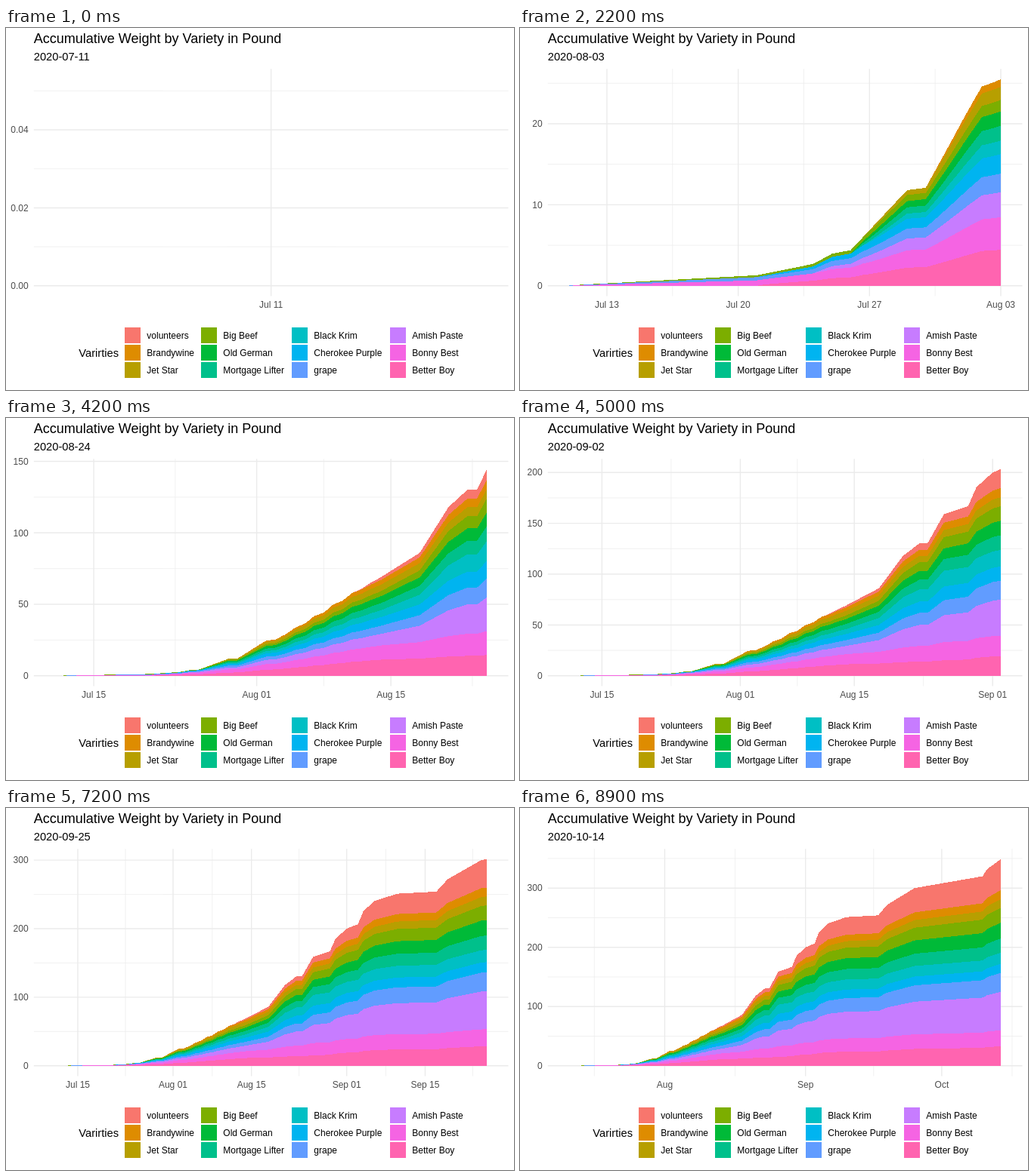
These frames come from a looping animation (672x480 px, 10 s). An HTML page with a canvas:

```html
<!DOCTYPE html>
<html lang="en">
<head>
<meta charset="utf-8">
<title>Accumulative Weight by Variety in Pound</title>
<style>
  html, body { margin: 0; width: 100%; height: 100%; overflow: hidden; background: #fff; }
  canvas { display: block; }
</style>
</head>
<body>
<canvas id="stage" width="672" height="480"></canvas>
<script>
const ctx = document.getElementById('stage').getContext('2d');
const FONT = '"Liberation Sans", Arial, sans-serif';
const PANEL = { left: 36.8, right: 664.5, top: 54.2, bottom: 355.5 };
const PAD = 0.05;
const LOOP_MS = 10000, STEP_MS = 100, LAST_STEP = 89, LAST_DAY = 95;
const DAY_MS = 864e5, START = Date.UTC(2020, 6, 11);

// Turning points of the total harvest: [day, pounds].
const TURNS = [
  [0, .053], [10, 1.3], [13, 2.7], [14, 3.95], [15, 4.4], [18, 11.8], [19, 12.1], [22, 24.8],
  [23, 25.5], [31, 58.1], [34, 69.3], [38, 86], [41, 118], [43, 130.3], [44, 130.3],
  [46, 158.8], [49, 167], [50, 185.5], [52, 200], [54, 206.5], [55, 226], [57, 240.5],
  [61, 251], [68, 254], [70, 272], [76, 300], [91, 320], [92, 332], [95, 348.8],
];

// Bottom of the stack first. A variety sets in once the total passes `since`;
// `crop` is its weight when the total reaches each of STAGES.
const STAGES = [69.3, 158.8, 348.8];
const VARIETIES = [
  { name: 'Better Boy', since: 1.3, crop: [11.3, 15.2, 33] },
  { name: 'Bonny Best', since: .053, crop: [10, 18, 27] },
  { name: 'Amish Paste', since: 2.7, crop: [8.1, 26.4, 65] },
  { name: 'grape', since: 0, crop: [5.7, 14.7, 32] },
  { name: 'Cherokee Purple', since: 1.3, crop: [6.1, 13.5, 15.3] },
  { name: 'Black Krim', since: 6, crop: [4.8, 15.5, 18.7] },
  { name: 'Mortgage Lifter', since: 4.4, crop: [5, 11.5, 24] },
  { name: 'Old German', since: 4.4, crop: [4.9, 10.5, 26.5] },
  { name: 'Big Beef', since: .053, crop: [3.5, 11, 25] },
  { name: 'Jet Star', since: 6, crop: [4.6, 7, 15] },
  { name: 'Brandywine', since: 12, crop: [3.3, 7.2, 15] },
  { name: 'volunteers', since: 58, crop: [2, 8.3, 52.3] },
];
const COLORS = ['#FF64B0', '#F564E3', '#C77CFF', '#619CFF', '#00B4F0', '#00BFC4',
  '#00C08B', '#00BA38', '#7CAE00', '#B79F00', '#DE8C00', '#F8766D'];

const lerp = (a, b, u) => a + (b - a) * u;

function totalAt(day) {
  const i = Math.max(1, TURNS.findIndex(p => p[0] >= day));
  const [d0, v0] = TURNS[i - 1], [d1, v1] = TURNS[i];
  // Around early August the big pickings come every other day.
  const evenDay = Math.abs(day % 2 - 1);
  const lull = 1.7 * evenDay * Math.exp(-(((day - 28) / 4) ** 2));
  return lerp(v0, v1, (day - d0) / (d1 - d0)) - lull;
}

function cropAt(total, { since, crop }) {
  const [s0, s1, s2] = STAGES;
  if (total <= since) return 0;
  if (total < s0) return crop[0] * ((total - since) / (s0 - since)) ** 0.8;
  return total < s1
    ? lerp(crop[0], crop[1], (total - s0) / (s1 - s0))
    : lerp(crop[1], crop[2], (total - s1) / (s2 - s1));
}

// Upper edge of each band, scaled so that the top one is the total.
function stackAt(day) {
  const total = totalAt(day);
  let sum = 0;
  const tops = VARIETIES.map(v => sum += cropAt(total, v));
  return tops.map(top => top * total / sum);
}

const dateOf = day => new Date(START + Math.floor(day) * DAY_MS);
const dayOfMonth = day => dateOf(day).getUTCDate();
const DATE_STEPS = [
  { size: 1, hit: () => true },
  { size: 2, hit: (day, first) => (day - first) % 2 === 0 },
  { size: 7, hit: day => dateOf(day).getUTCDay() === 1 },
  { size: 15.22, hit: day => [1, 15].includes(dayOfMonth(day)) },
  { size: 30.44, hit: day => dayOfMonth(day) === 1, monthly: true },
];

// Ticks of one calendar step that just cover lo..hi.
function dateTicks(step, lo, hi) {
  const first = Math.floor(lo), all = [];
  for (let day = first - 32; day < hi + 32; day++) if (step.hit(day, first)) all.push(day);
  const begin = all.filter(d => d <= lo).length - 1;
  return all.slice(begin, all.findIndex(d => d >= hi) + 1);
}

function dateBreaks(lo, hi) {
  const goal = 5, span = hi - lo;
  const miss = i => Math.abs(span / DATE_STEPS[i].size - goal);
  let best = 0;
  if (span > goal) {
    DATE_STEPS.forEach((_, i) => { if (miss(i) < miss(best)) best = i; });
    const count = i => dateTicks(DATE_STEPS[i], lo, hi).length - 1;
    const n = count(best);
    const other = Math.min(DATE_STEPS.length - 1, Math.max(0, best + Math.sign(n - goal)));
    if (Math.abs(count(other) - goal) < Math.abs(n - goal)) best = other;
  }
  const step = DATE_STEPS[best];
  const label = day => {
    const month = dateOf(day).toLocaleString('en-US', { month: 'short', timeZone: 'UTC' });
    return step.monthly ? month : month + ' ' + String(dayOfMonth(day)).padStart(2, '0');
  };
  return { ticks: dateTicks(step, lo, hi), label };
}

// Extended Wilkinson labelling, aiming at five labels.
function numberBreaks(lo, hi) {
  const range = hi - lo, power = Math.floor(Math.log10(range));
  let best = { score: -Infinity };
  [1, 5, 2, 2.5, 4, 3].forEach((q, rank) => {
    for (let z = power - 2; z <= power; z++) {
      const step = q * 10 ** z;
      for (let k = 2; k <= 12; k++) {
        for (let s = Math.floor(lo / step); s <= Math.ceil(lo / step) + 1; s++) {
          const a = s * step, b = (s + k - 1) * step;
          const simple = 1 - rank / 5 - (a <= 0 && b >= 0 ? 0 : 1);
          const cover = 1 - 0.5 * ((hi - b) ** 2 + (lo - a) ** 2) / (0.1 * range) ** 2;
          const ratio = (1 / step) / (4 / (Math.max(b, hi) - Math.min(a, lo)));
          const dense = 2 - Math.max(ratio, 1 / ratio);
          const score = 0.25 * simple + 0.2 * cover + 0.5 * dense;
          if (score > best.score) best = { score, step, s, k };
        }
      }
    }
  });
  const { step, s, k } = best;
  let digits = 0;
  while (Math.abs(step * 10 ** digits - Math.round(step * 10 ** digits)) > 1e-6) digits++;
  return {
    ticks: Array.from({ length: k }, (_, i) => (s + i) * step),
    label: v => v.toFixed(digits),
  };
}

// Major ticks in view, and the midpoints with one extra tick at each end.
function gridOf({ ticks, label }, lo, hi) {
  const inside = v => v >= lo && v <= hi;
  const major = ticks.filter(inside);
  if (major.length < 2) return { major, minor: [], label };
  const gap = major[1] - major[0];
  const wide = [major[0] - gap, ...major, major[major.length - 1] + gap];
  const minor = wide.slice(1).map((v, i) => (v + wide[i]) / 2).filter(inside);
  return { major, minor, label };
}

function text(str, x, y, size, color = '#000', align = 'left') {
  ctx.font = `${size}px ${FONT}`;
  ctx.fillStyle = color;
  ctx.textAlign = align;
  ctx.fillText(str, x, y);
}

function gridLines(xs, ys, width) {
  ctx.strokeStyle = '#EBEBEB';
  ctx.lineWidth = width;
  ctx.beginPath();
  for (const y of ys) { ctx.moveTo(PANEL.left, y); ctx.lineTo(PANEL.right, y); }
  for (const x of xs) { ctx.moveTo(x, PANEL.top); ctx.lineTo(x, PANEL.bottom); }
  ctx.stroke();
}

function drawLegend() {
  text('Varirties', 96.3, 436, 14.67);
  const columns = [157, 258, 378, 508];
  VARIETIES.forEach(({ name }, i) => {
    const place = VARIETIES.length - 1 - i;
    const x = columns[Math.floor(place / 3)], y = 397 + (place % 3) * 23;
    ctx.fillStyle = COLORS[i];
    ctx.fillRect(x, y, 21, 21);
    text(name, x + 29.3, y + 15, 12);
  });
}

// Whole-pixel columns give the bands hard edges.
function drawAreas(days, px, py) {
  const left = px(0), right = px(days), base = Math.round(py(0));
  for (let x = Math.round(left); x < Math.round(right); x++) {
    const day = Math.min(days, Math.max(0, (x + 0.5 - left) / (right - left) * days));
    const tops = stackAt(day);
    for (let i = tops.length - 1; i >= 0; i--) {
      const y = Math.round(py(tops[i]));
      ctx.fillStyle = COLORS[i];
      ctx.fillRect(x, y, 1, base - y);
    }
  }
}

function draw(step) {
  const time = step * LAST_DAY / LAST_STEP;
  const days = Math.round(time), peak = totalAt(days);
  const xPad = days ? days * PAD : 0.05, yPad = peak * PAD;
  const xLo = -xPad, xHi = days + xPad, yLo = -yPad, yHi = peak + yPad;
  const px = d => lerp(PANEL.left, PANEL.right, (d - xLo) / (xHi - xLo));
  const py = v => lerp(PANEL.bottom, PANEL.top, (v - yLo) / (yHi - yLo));
  const xGrid = gridOf(dateBreaks(xLo, xHi), xLo, xHi);
  const yGrid = gridOf(numberBreaks(yLo, yHi), yLo, yHi);

  ctx.fillStyle = '#fff';
  ctx.fillRect(0, 0, 672, 480);
  gridLines(xGrid.minor.map(px), yGrid.minor.map(py), 0.71);
  gridLines(xGrid.major.map(px), yGrid.major.map(py), 1.42);
  if (days) drawAreas(days, px, py);

  for (const d of xGrid.major) text(xGrid.label(d), px(d), 371, 12, '#4D4D4D', 'center');
  for (const v of yGrid.major) text(yGrid.label(v), 29.6, py(v) + 4.2, 12, '#4D4D4D', 'right');
  text('Accumulative Weight by Variety in Pound', 36.8, 20, 18);
  text(dateOf(time + 1e-6).toISOString().slice(0, 10), 36.8, 43, 14.67);
  drawLegend();
}

let shown = -1;
const origin = performance.now();
function tick() {
  const elapsed = (performance.now() - origin) % LOOP_MS;
  const step = Math.min(LAST_STEP, Math.floor(elapsed / STEP_MS));
  if (step !== shown) draw(shown = step);
  requestAnimationFrame(tick);
}
tick();
</script>
</body>
</html>
```
